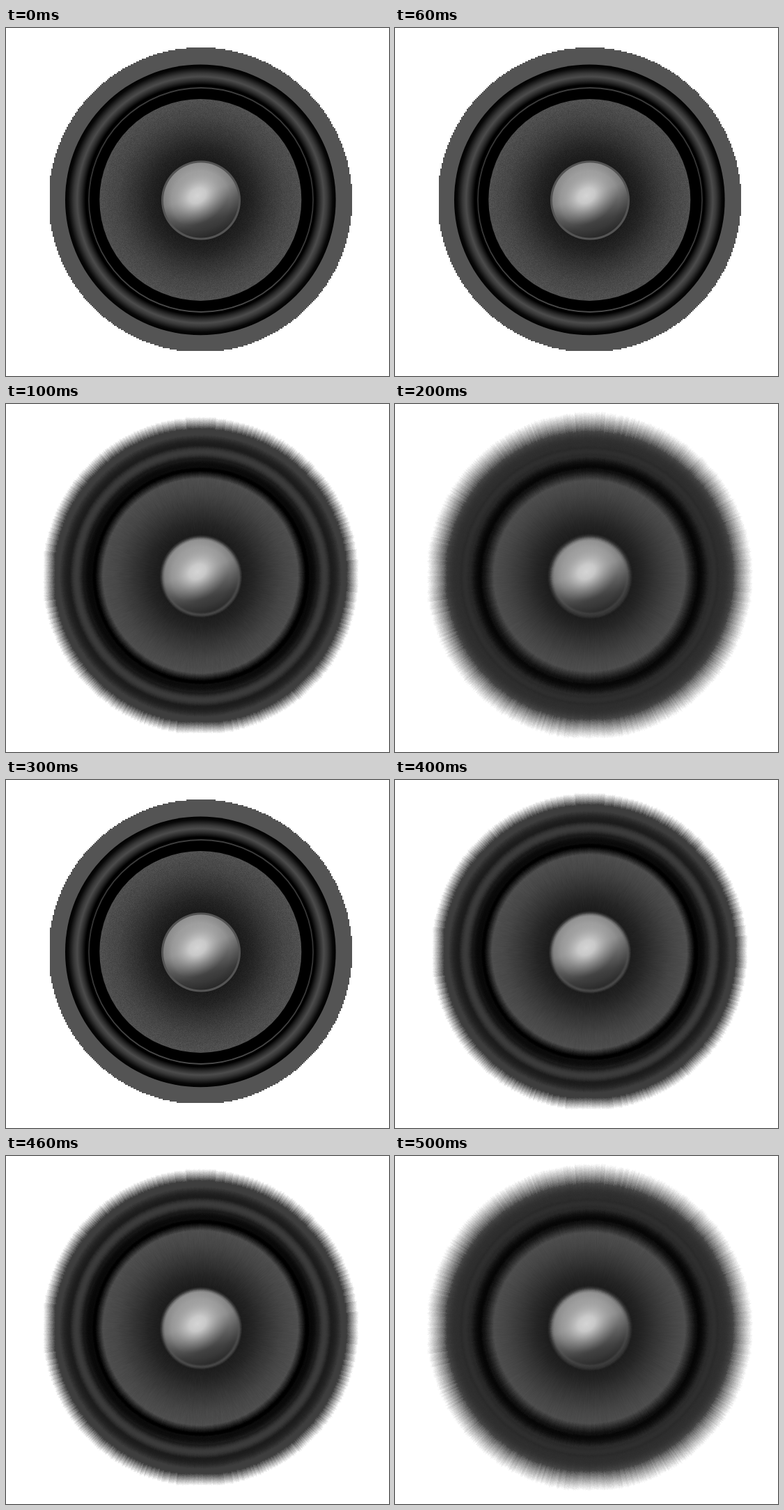
Write an HTML page with a canvas that moves like this. It is 550x500 px and loops after 0.6 s.

```html
<!DOCTYPE html>
<html lang="en">
<head>
<meta charset="utf-8">
<title>Pulsing speaker</title>
<style>
  html, body { margin: 0; width: 100%; height: 100%; overflow: hidden; background: #fff; }
  canvas { position: absolute; left: 0; top: 0; width: 550px; height: 500px; }
</style>
</head>
<body>
<script>
const W = 550, H = 500, CX = 279.3, CY = 246.9;
const EDGE = 218;          // radius of the outer plate
const STEP = 100, LOOP = 3; // ms per pose, poses per pulse

let seed = 7;
const rand = () => (seed = (seed * 16807) % 2147483647) / 2147483647;
const gray = (v, a = 1) => `rgba(${v},${v},${v},${a})`;

function layer() {
  const c = document.createElement('canvas');
  c.width = W;
  c.height = H;
  return c;
}

function disc(g, x, y, r, fill) {
  g.fillStyle = fill;
  g.beginPath();
  g.arc(x, y, r, 0, Math.PI * 2);
  g.fill();
}

// Radial gradient whose stops are [radius, gray, alpha].
function rings(g, x, y, r, stops) {
  const grad = g.createRadialGradient(x, y, 0, x, y, r);
  for (const [at, v, a] of stops) grad.addColorStop(at / r, gray(v, a));
  return grad;
}

// Stepped disc with slightly flattened extremes.
function plate(g, tone) {
  g.fillStyle = gray(tone);
  for (let y = 0; y < H; y += 2) {
    const d = y + 1 - CY;
    if (Math.abs(d) > EDGE) continue;
    const half = Math.min(EDGE, Math.sqrt((EDGE + 1) ** 2 - d * d));
    const x0 = Math.round((CX - half) / 2) * 2 + 1;
    const x1 = Math.round((CX + half) / 2) * 2 - 1;
    g.fillRect(x0, y, x1 - x0, 2);
  }
}

function grain(g) {
  const img = g.getImageData(0, 0, W, H), px = img.data;
  for (let y = 0; y < H; y++) {
    for (let x = 0; x < W; x++) {
      const r = Math.hypot(x + .5 - CX, y + .5 - CY);
      if (r < 59 || r > 144) continue;
      const n = (rand() + rand() - 1) * (5 + (r - 59) / 14);
      const i = (y * W + x) * 4;
      for (let k = 0; k < 3; k++) px[i + k] += n;
    }
  }
  g.putImageData(img, 0, 0);
}

function dome(g) {
  const x = 280, y = 247.6;
  disc(g, x, y, 57, gray(84));
  const shade = g.createLinearGradient(262, 196, 298, 300);
  shade.addColorStop(0, gray(164));
  shade.addColorStop(.42, gray(140));
  shade.addColorStop(.62, gray(98));
  shade.addColorStop(.8, gray(64));
  shade.addColorStop(1, gray(44));
  disc(g, x, y, 54, shade);

  // Oblong highlight leaning towards the lower left.
  g.save();
  g.beginPath();
  g.arc(x, y, 54, 0, Math.PI * 2);
  g.clip();
  g.translate(275, 241);
  g.rotate(-.6);
  g.scale(1, .76);
  disc(g, 0, 0, 50, rings(g, 0, 0, 50,
    [[0, 212, 1], [13, 208, .9], [30, 190, .45], [50, 160, 0]]));
  g.restore();
  disc(g, x, y, 54, rings(g, x, y, 54, [[0, 0, 0], [42, 0, 0], [54, 0, .12]]));
}

function speaker(plateTone) {
  const c = layer(), g = c.getContext('2d', { willReadFrequently: true });
  g.fillStyle = '#fff';
  g.fillRect(0, 0, W, H);
  plate(g, plateTone);
  disc(g, CX, CY, 194.3, rings(g, CX, CY, 194.3,
    [[0, 0], [165, 0], [171, 42], [177, 76], [182, 56], [190, 8], [194.3, 0]]));

  const rim = g.createLinearGradient(0, 85, 0, 409);
  rim.addColorStop(0, gray(62));
  rim.addColorStop(.5, gray(50));
  rim.addColorStop(1, gray(74));
  g.strokeStyle = rim;
  g.lineWidth = 1.8;
  g.beginPath();
  g.arc(280, 247, 161, 0, Math.PI * 2);
  g.stroke();

  disc(g, CX, CY, 145, rings(g, CX, CY, 145,
    [[0, 24], [57, 27], [75, 36], [95, 52], [120, 70], [145, 80]]));
  grain(g);
  dome(g);
  return c;
}

// Average along each ray through the centre, over scales 1 - inner to 1 + outer.
function zoomBlur(from, inner, outer) {
  const src = from.getContext('2d').getImageData(0, 0, W, H).data;
  const c = layer(), g = c.getContext('2d');
  const img = g.createImageData(W, H), out = img.data;
  const taps = 28, spokes = 700, span = inner + outer;
  const wobble = Array.from({ length: spokes + 1 }, () => (rand() - .5) * span * .05);
  for (let y = 0; y < H; y++) {
    for (let x = 0; x < W; x++) {
      const dx = x + .5 - CX, dy = y + .5 - CY;
      const o = (y * W + x) * 4;
      let sum = 0;
      if (dx * dx + dy * dy > 245 * 245) {
        sum = 255 * taps;
      } else {
        const spoke = Math.floor((Math.atan2(dy, dx) / Math.PI + 1) / 2 * spokes);
        const shift = wobble[spoke] + (rand() - .5) * span * .06;
        for (let t = 0; t < taps; t++) {
          const k = 1 + shift - inner + span * (t + .5) / taps;
          const sx = Math.min(W - 1, Math.max(0, Math.floor(CX + dx * k)));
          const sy = Math.min(H - 1, Math.max(0, Math.floor(CY + dy * k)));
          sum += src[(sy * W + sx) * 4];
        }
      }
      out[o] = out[o + 1] = out[o + 2] = sum / taps;
      out[o + 3] = 255;
    }
  }
  g.putImageData(img, 0, 0);
  return c;
}

const poses = [
  speaker(84),
  zoomBlur(speaker(62), .041, .036),
  zoomBlur(speaker(74), .07, .056)
];
document.body.append(...poses);

poses.forEach((pose, n) => {
  if (!n) return;
  const frames = [0, 1, 2].map(i => ({
    opacity: i === n ? 1 : 0, offset: i / LOOP, easing: 'steps(1, end)'
  }));
  frames.push({ opacity: 0, offset: 1 });
  pose.animate(frames, { duration: STEP * LOOP, iterations: Infinity });
});
</script>
</body>
</html>
```
